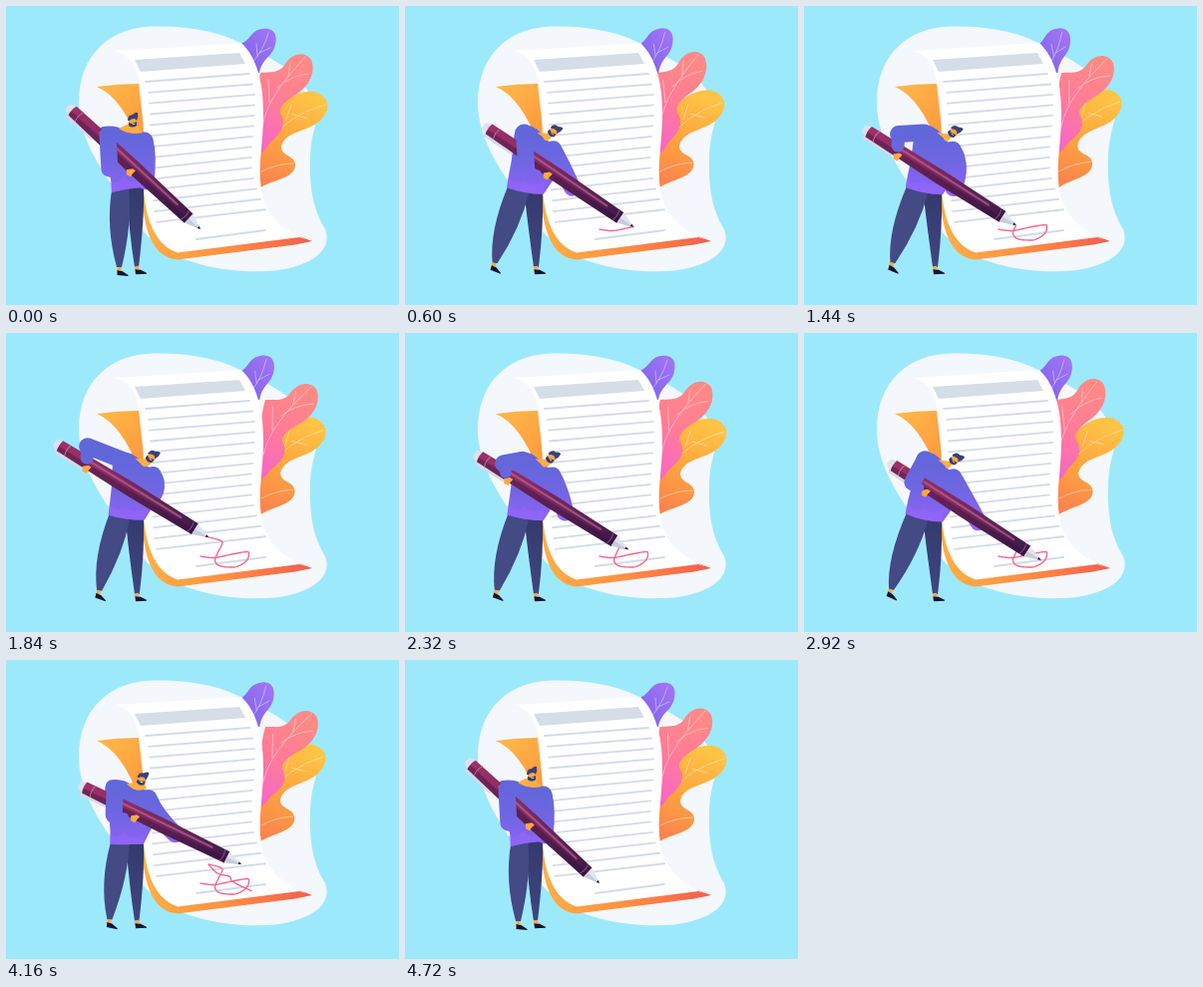
Recreate the animation shown at these times as an HTML page with a canvas. Size 394 by 300 pixels, loop 4.76 s.

```html
<!DOCTYPE html>
<html lang="en">
<head>
<meta charset="utf-8">
<title>Signing a document</title>
<style>
  html, body { margin: 0; width: 100%; height: 100%; overflow: hidden; background: #9de9fc; }
  canvas { display: block; }
</style>
</head>
<body>
<canvas id="stage" width="394" height="300"></canvas>
<script>
const LOOP = 4760, SIGN_END = 3440;
const ctx = document.getElementById('stage').getContext('2d');

// time, pen tip x, y
const tipKeys = [
  [0, 195, 224], [250, 207, 225.5], [600, 229, 221.5], [790, 242.5, 219.5], [860, 243.5, 223],
  [960, 239.5, 230], [1090, 228, 235], [1230, 214, 233.5], [1330, 209.5, 228], [1440, 212.5, 220],
  [1650, 217, 210], [1850, 203, 205], [2080, 212, 214], [2320, 223.5, 217], [2600, 227, 222],
  [2950, 238, 228], [3400, 246, 231.5], [3520, 246, 231], [3900, 238, 212], [4160, 236, 205],
  [4500, 195, 224], [LOOP, 195, 224]
];
// time, pen angle, body lean, distance from tip to back hand
const poseKeys = [
  [0, 42.8, 0, 90], [600, 34.1, 0.97, 100], [1440, 32.4, 1.02, 137], [1900, 31.6, 0.82, 140],
  [2320, 32, 0.88, 138], [3440, 33.1, 1.18, 128], [4160, 26.1, 0.4, 116],
  [4500, 42.8, 0, 90], [LOOP, 42.8, 0, 90]
];

const lerp = (a, b, k) => a + (b - a) * k;
const clamp = v => Math.max(0, Math.min(1, v));

// Smooth curve through the keys, resting at turning points
function track(keys, t) {
  let i = 0;
  while (i < keys.length - 2 && t >= keys[i + 1][0]) i++;
  const slope = (j, c) => {
    const a = keys[j - 1], b = keys[j], n = keys[j + 1];
    return !a || !n || (b[c] - a[c]) * (n[c] - b[c]) <= 0 ? 0 : (n[c] - a[c]) / (n[0] - a[0]);
  };
  const p = keys[i], q = keys[i + 1], span = q[0] - p[0], u = (t - p[0]) / span;
  return p.slice(1).map((v, j) => {
    const s = u * u * (3 - 2 * u);
    return lerp(v, q[j + 1], s) + span * u * (1 - u) *
      ((1 - u) * slope(i, j + 1) - u * slope(i + 1, j + 1));
  });
}

function morph(a, b, k) {
  const to = b.match(/-?[\d.]+/g);
  let i = 0;
  return a.replace(/-?[\d.]+/g, v => lerp(+v, +to[i++], k).toFixed(2));
}

function gradient(x0, y0, x1, y1, ...colors) {
  const g = ctx.createLinearGradient(x0, y0, x1, y1);
  colors.forEach((c, i) => g.addColorStop(i / (colors.length - 1), c));
  return g;
}

function fill(path, color) {
  ctx.fillStyle = color;
  ctx.fill(new Path2D(path));
}

function stroke(path, color, width) {
  ctx.strokeStyle = color;
  ctx.lineWidth = width;
  ctx.lineCap = ctx.lineJoin = 'round';
  ctx.stroke(new Path2D(path));
}

function placed(x, y, angle, draw) {
  ctx.save();
  ctx.translate(x, y);
  ctx.rotate(angle);
  draw();
  ctx.restore();
}

function leaf(x, y, angle, shape, color, veins) {
  placed(x, y, angle, () => {
    ctx.translate(-x, -y);
    fill(shape, color);
    stroke(veins, 'rgba(255,255,255,.5)', 0.8);
  });
}

function drawLeaves(t) {
  const phase = t / (LOOP / 2) * 2 * Math.PI, c = Math.cos(phase) - 1, s = Math.sin(phase);
  leaf(254, 62, c * 0.07,
    'M234 38C245 36 245 24 257 23C270 21 273 31 269 42C265 52 257 53 254 67L240 64Z',
    gradient(240, 50, 270, 28, '#8667ec', '#a374f5'),
    'M246 58Q258 45 263 27M252 50L251 38M254 47L265 42');
  leaf(256, 178, c * 0.027,
    'M254 183C266 174 290 174 290 159C289 149 276 151 276 141C280 125 301 127 315 115C328 102 323 90 309 86C291 84 280 95 268 104L254 140Z',
    gradient(305, 90, 262, 178, '#ffc445', '#ffa63f', '#fa834e'),
    'M256 166Q272 158 288 158M264 136Q283 109 320 99M281 114L286 99M288 109L302 113');
  leaf(257, 142, -s * 0.066,
    'M256 147C252 120 250 90 255 67C264 66 274 68 280 58C287 47 300 45 306 54C311 66 304 80 292 88C281 95 273 101 275 108C281 117 277 126 269 133C262 138 262 144 256 147Z',
    gradient(290, 55, 258, 140, '#ff8a85', '#ff7b97', '#f768c4'),
    'M257 122C260 95 285 68 300 51M264 97L263 74M283 70L285 57M272 82Q285 70 303 68');
}

function drawPaper() {
  fill('M91 81Q112 78 133 78L140 140L134 140Q117 92 91 81Z', gradient(95, 80, 138, 125, '#ffb74a', '#ff9a3d'));
  fill('M136 185C138 224 146 252 172 254.5L290 239.5L307 236L294 231L172 245C150 238 142 215 139 190Z',
    gradient(140, 230, 300, 238, '#ffae45', '#ff9043', '#f4614c'));
  fill('M110 45L236 37C252 52 258 78 258 108C258 138 252 160 256 184C260 211 280 228 307 236L294 232L172 247.5C149 240 139 212 138 180C136 155 139 125 137 98C135 70 128 49 110 45Z',
    '#ffffff');
  fill('M129 54L234 47L240 58L135 66Z', '#d5dde7');
  const left = [140, 143, 144, 145, 145, 146, 147, 147, 147, 147, 147, 148, 149, 151];
  const right = [244, 247, 249, 249, 249, 248, 247, 246, 246, 246, 248, 251, 255, 260];
  left.forEach((x, i) =>
    stroke(`M${x} ${76 + i * 10.84}L${right[i]} ${68 + i * 10.48}`, '#d3dbe7', 1.8));
  stroke('M191 234L260 225', '#d3dbe7', 1.8);
}

function drawSignature(t) {
  ctx.globalAlpha = clamp((4480 - t) / 200);
  let path = 'M195 224';
  for (let s = 0; s < Math.min(t, SIGN_END); s += 20) path += 'L' + track(tipKeys, s);
  if (t > 40) stroke(path, '#f5668f', 1.4);
  ctx.globalAlpha = 1;
}

function drawLegs(k) {
  fill(morph('M121 182L138 181Q139 212 133 262L129 262Q123 226 121 182Z',
    'M119 184L138 187Q139 222 134 262L129 262Q124 226 119 184Z', k),
    gradient(120, 185, 134, 262, '#343a6d', '#3f467f'));
  fill(morph('M106 185L123 181Q127 216 116 262L111 262Q100 222 106 185Z',
    'M103 181L125 185Q116 222 92 258L87 258Q84 226 103 181Z', k), '#434a84');
  const shoe = 'M-2 3Q1 4 3 4L9 8L9 9L-2 8Z';
  const foot = (x, y, angle) => placed(x, y, angle, () => {
    fill('M-2 0L2 0L2 4L-2 4Z', '#ffa742');
    fill(shoe, '#17142f');
  });
  foot(131, 261, -0.12);
  foot(lerp(113.5, 89, k), lerp(262, 257.5, k), lerp(0, 0.3, k));
}

function drawHead(k) {
  fill(morph('M113 123L123 118L130 119L137 127Q124 130 113 123Z',
    'M133 127L144 128L150 128L147 132L142 139Q139 132 133 127Z', k), '#ffae45');
  placed(lerp(127, 150, k), lerp(115, 125.5, k), 0.8 * k, () => {
    fill('M-4 -4L4 -4L5 4L0 7L-4 5Z', '#ffa742');
    fill('M-4 2L-1 3L4 1L4 5Q0 8 -4 5Z', '#353a70');
    fill('M-5 0Q-5 -6 0 -6Q3 -9 5 -8Q6 -4 4 0L2 -2Q-2 -2 -3 0Z', '#3a4079');
    stroke('M0 3.4L2 3.2', '#ffffff', 0.8);
  });
}

function drawPen(tip, angle) {
  placed(...tip, angle, () => {
    fill('M-181 -4Q-182 0 -181 4L-174 6L-174 -6Z', '#dce2ec');
    fill('M-177 5L-142 7L-142 9L-176 9Z', '#d3dbe8');
    fill('M-175 -6Q-177 0 -175 6L-90 7.3L-16 6.3L-16 -6.3L-90 -7.3Z',
      gradient(-174, 0, -14, 0, '#9c3168', '#852c63', '#652658', '#3d1947'));
    fill('M-175 1Q-176 4 -175 6L-90 7.3L-16 6.3L-16 1Z', 'rgba(38,12,54,.34)');
    stroke('M-140 -2.5L-34 -2.5', 'rgba(196,98,146,.65)', 2.3);
    stroke('M-166 -6Q-168 0 -166 6', '#c4789f', 0.9);
    stroke('M-21 -5.5Q-19 0 -21 5.5', '#8a4a80', 1);
    fill('M-16 -6L-2 -1L-2 1L-16 6Z', '#dfe5ee');
    fill('M-16 0L-2 0L-2 1L-16 6Z', '#c5cddb');
    fill('M-3 -1.5L0 0L-3 1.5Z', '#1d1730');
  });
}

function drawMan(t) {
  const tip = track(tipKeys, t), [degrees, k, reach] = track(poseKeys, t);
  const angle = degrees * Math.PI / 180, cos = Math.cos(angle), sin = Math.sin(angle);
  const onPen = (d, side) => [tip[0] - d * cos - side * sin, tip[1] - d * sin + side * cos];
  const shirt = gradient(0, 122, 0, 190, '#6067d8', '#6f66e2', '#9062f7');

  drawLegs(k);
  const grip = onPen(73, 2);
  const elbow = [lerp(143, 159, k), lerp(150, 162, k)];
  stroke(`M${lerp(139, 149, k)} ${lerp(135, 144, k)}Q${elbow} ${grip}`, shirt, 17);
  fill(morph('M97 121Q111 119 121 126L135 126Q147 127 148 138L146 160L137 182Q121 183 106 187Q106 170 100 155L92 132Q91 123 97 121Z',
    'M115 120Q127 117 136 127L144 136Q160 140 161 152L152 170L139 189Q120 189 102 182Q104 168 107 155L110 130Q111 122 115 120Z', k), shirt);
  fill(morph('M104 177Q114 178 118 171Q126 181 137 174L137 182Q121 183 106 187Z',
    'M103 172Q113 181 120 175Q128 183 140 176L139 189Q120 189 102 182Z', k), 'rgba(154,104,255,.4)');
  drawHead(k);
  drawPen(tip, angle);

  const hand = onPen(reach, 6), shoulder = [lerp(102, 120, k), lerp(130, 127, k)];
  const reachRight = clamp((hand[0] - shoulder[0] + 25) / 40);
  const bend = [hand[0] + lerp(1, -21, reachRight), hand[1] + lerp(-23, -4, reachRight)];
  const wrist = [lerp(bend[0], hand[0], 0.5), lerp(bend[1], hand[1], 0.5)];
  fill(`M${hand[0] - 4} ${hand[1] - 3}l6 -1l3 2l-3 3l-2 3l-4 -2Z`, '#ffa742');
  stroke(`M${bend}L${wrist}`, shirt, lerp(13, 8, reachRight));
  stroke(`M${shoulder}L${bend}`, shirt, 17);
}

function frame(now) {
  const t = now % LOOP;
  ctx.fillStyle = '#9de9fc';
  ctx.fillRect(0, 0, 394, 300);
  fill('M73 97C73 48 105 20.5 150 20.5C188 20 219 27 242 41C280 58 309 78 312 112C307 130 305 140 305 155C304 188 310 208 320 224C328 245 306 261 270 265.5C230 269 190 261 165 248C140 235 122 208 106 180C92 158 73 130 73 97Z',
    '#f4f7fb');
  drawLeaves(t);
  drawPaper();
  drawSignature(t);
  drawMan(t);
  requestAnimationFrame(frame);
}
requestAnimationFrame(frame);
</script>
</body>
</html>
```
